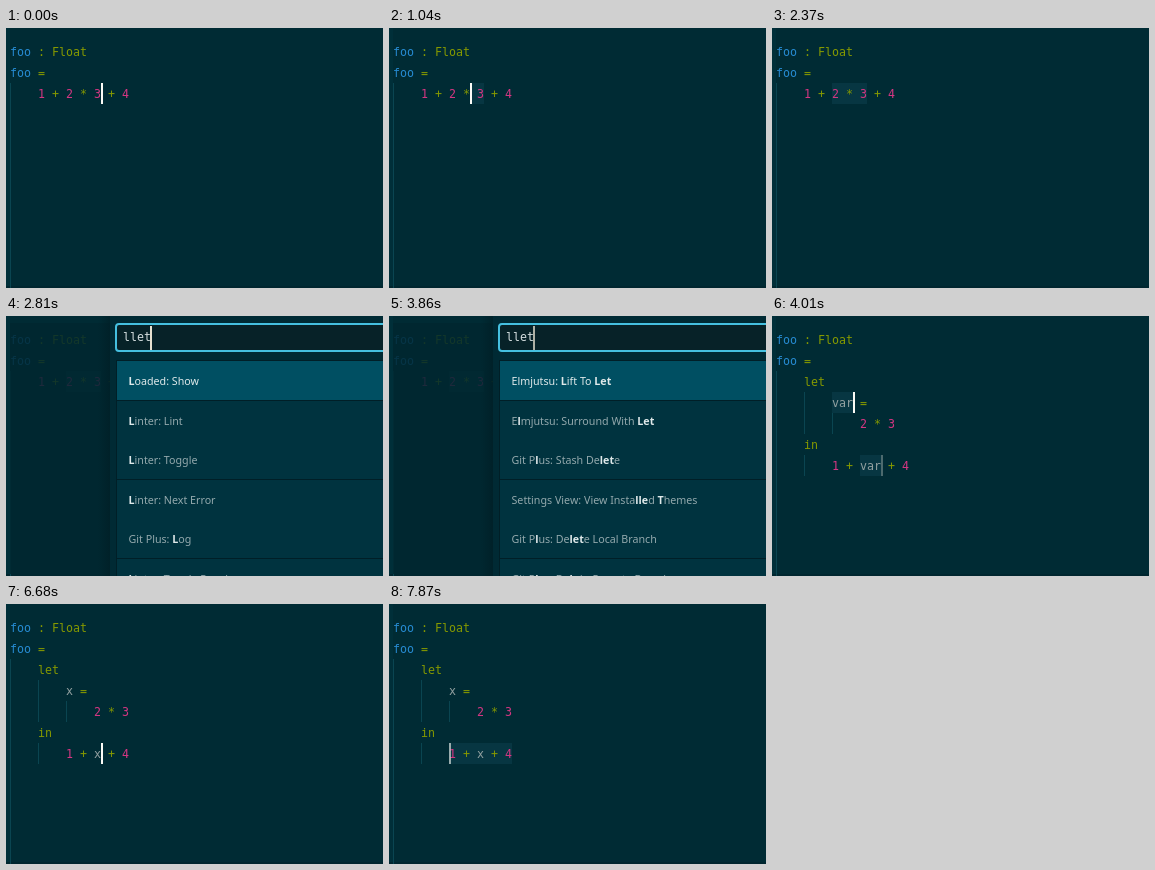
An HTML page with a canvas for the animation above (8 s loop, 377 px wide and 260 px high).

```html
<!DOCTYPE html>
<html lang="en">
<head>
<meta charset="utf-8">
<title>Lift to let</title>
<style>
html, body { margin: 0; width: 377px; height: 260px; overflow: hidden; background: #002b34; }
canvas { display: block; }
</style>
</head>
<body>
<canvas id="stage" width="377" height="260"></canvas>
<script>
const ctx = document.getElementById('stage').getContext('2d');
const LOOP = 8000, COL = 7, ROW = 21, LEFT = 4, TOP = 13;
const MONO = '11.63px "DejaVu Sans Mono", monospace';
const UI = '10.7px "Noto Sans", sans-serif';
const UI_BOLD = 'bold ' + UI;
const BLUE = '#268bd2', GREEN = '#859900', PINK = '#d33682', GRAY = '#93a1a1';

const colX = c => LEFT + c * COL;
const rowY = r => TOP + r * ROW;

function rect(x, y, w, h, color) {
  ctx.fillStyle = color;
  ctx.fillRect(x, y, w, h);
}

function text(str, x, y, font, color) {
  ctx.font = font;
  ctx.fillStyle = color;
  ctx.fillText(str, x, y);
}

function tokenColor(tok) {
  if (tok === 'foo') return BLUE;
  if (/^\d/.test(tok)) return PINK;
  return /^(x|var)$/.test(tok) ? GRAY : GREEN;
}

function codeLine(str, row) {
  for (const m of str.matchAll(/\S+/g))
    text(m[0], colX(m.index), rowY(row) + 15, MONO, tokenColor(m[0]));
}

function guide(col, row, rows) {
  rect(colX(col), rowY(row), 1, rows * ROW, '#0a4551');
}

function select(row, from, to) {
  rect(colX(from), rowY(row), (to - from) * COL, ROW, '#073642');
}

function caret(row, col, alpha) {
  ctx.globalAlpha = alpha;
  rect(colX(col), rowY(row), 2, ROW, '#fbfbf6');
  ctx.globalAlpha = 1;
}

function editor(lines, selections, carets) {
  rect(0, 0, 377, 260, '#002b34');
  rect(0, 0, 4, 260, '#002f39');
  rect(0, 258, 377, 2, '#00262f');
  guide(0, 2, 10);
  if (lines.length > 3) {
    guide(4, 3, 2);
    guide(8, 4, 1);
    guide(4, 6, 1);
  }
  selections.forEach(s => select(...s));
  lines.forEach(codeLine);
  carets.forEach(c => caret(...c));
}

const before = ['foo : Float', 'foo =', '    1 + 2 * 3 + 4'];
const after = name => ['foo : Float', 'foo =', '    let', `        ${name} =`,
  '            2 * 3', '    in', `        1 + ${name} + 4`];

// Matched letters stand between asterisks.
const firstHits = ['*L*oaded: Show', '*L*inter: Lint', '*L*inter: Toggle',
  '*L*inter: Next Error', 'Git Plus: *L*og', '*L*inter: Toggle Panel'];
const finalHits = ['Elmjutsu: *L*ift To *Let*', 'E*l*mjutsu: Surround With *Let*',
  'Git P*l*us: Stash De*let*e', 'Settings View: View Insta*lle*d *T*hemes',
  'Git P*l*us: De*let*e Local Branch', 'Git P*l*us: De*let*e Remote Branch'];

function hit(str, i) {
  const y = Math.round(45 + i * 39.5), active = i === 0;
  rect(111, y, 266, 39, active ? '#004f62' : '#00333f');
  rect(111, y + 39, 266, 1, '#001f27');
  let x = 122.5;
  str.split('*').forEach((part, n) => {
    const bold = n % 2 === 1;
    text(part, x, y + 24, bold ? UI_BOLD : UI, bold || active ? '#dfe9ea' : '#93a9ad');
    x += ctx.measureText(part).width;
  });
}

function palette(query, hits, alpha) {
  editor(before, [[2, 8, 13]], []);
  rect(4, 7, 373, 251, 'rgba(0,39,48,0.86)');
  const shade = ctx.createLinearGradient(92, 0, 108, 0);
  shade.addColorStop(0, 'rgba(0,28,35,0)');
  shade.addColorStop(1, 'rgba(0,28,35,0.75)');
  rect(92, 0, 16, 260, shade);
  rect(104, 0, 273, 260, '#002a34');
  rect(110, 44, 267, 216, '#001f27');

  ctx.beginPath();
  ctx.roundRect(110, 8, 290, 27, 3);
  ctx.fillStyle = '#072228';
  ctx.fill();
  ctx.lineWidth = 2;
  ctx.strokeStyle = '#45c0e0';
  ctx.stroke();
  text(query, 117, 25, MONO, '#d5dfe0');
  ctx.globalAlpha = alpha;
  rect(116 + query.length * COL, 10, 2, 24, '#e6e1d0');
  ctx.globalAlpha = 1;
  hits.forEach(hit);
}

const start = (col, alpha = 1) => () =>
  editor(before, col < 13 ? [[2, col, 13]] : [], [[2, col, alpha]]);
const search = (query, hits, alpha = 1) => () => palette(query, hits, alpha);
const naming = (a, b = a) => () =>
  editor(after('var'), [[3, 8, 11], [6, 12, 15]], [[3, 11, a], [6, 15, b]]);
const typed = (a, b = a) => () =>
  editor(after('x'), [], [[3, 9, a], [6, 13, b]]);
const finish = (col, alpha = 1) => () =>
  editor(after('x'), col < 17 ? [[6, col, 17]] : [], [[6, col, alpha]]);

const steps = [
  [0, start(13)], [150, start(13, 0.5)], [300, start(13, 0)], [450, start(13, 0.3)],
  [600, start(13, 0.7)], [740, start(13)], [890, start(12)], [1040, start(11)],
  [1340, start(10)], [1480, start(9)], [1630, start(8)],
  [2220, start(8, 0.6)], [2370, start(8, 0)],
  [2520, search('l', firstHits)], [2660, search('ll', firstHits)],
  [2810, search('llet', firstHits)], [2960, search('llet', finalHits)],
  [3410, search('llet', finalHits, 0.5)], [3560, search('llet', finalHits, 0)],
  [3710, search('llet', finalHits, 0.3)], [3860, search('llet', finalHits, 0.75)],
  [4010, naming(1, 0.3)], [4160, naming(1, 0.7)], [4310, naming(1)],
  [4460, naming(0.6)], [4610, naming(0.15)], [4750, naming(0)],
  [4900, naming(0.4)], [5050, naming(1)], [5200, typed(1)],
  [5640, typed(0.6)], [5790, typed(0.15)], [5940, typed(0)],
  [6090, typed(0.4)], [6240, typed(1)], [6380, typed(0.8)],
  [6530, typed(0.4)], [6680, typed(0, 1)],
  [6830, finish(17)], [6980, finish(14)], [7120, finish(11)], [7270, finish(8)],
  [7870, finish(8, 0.6)]
];

function frame(now) {
  const t = now % LOOP;
  steps.findLast(([at]) => at <= t)[1]();
  requestAnimationFrame(frame);
}
requestAnimationFrame(frame);
</script>
</body>
</html>
```
